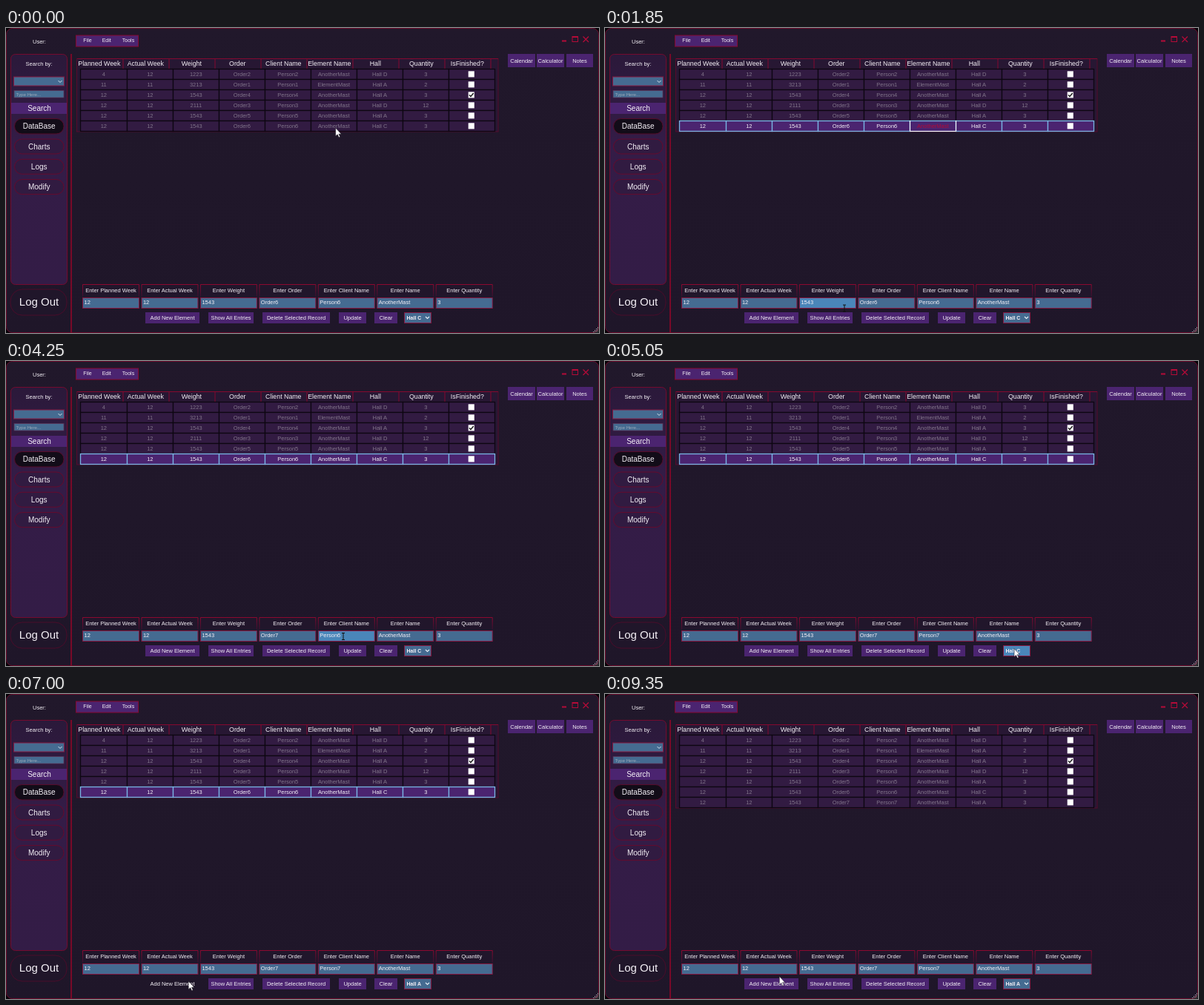
These frames come from a looping animation (800x412 px, 9.5 s). An HTML page:

```html
<!DOCTYPE html>
<html lang="en">
<head>
<meta charset="utf-8">
<title>Production database</title>
<style>
  html, body { margin: 0; width: 100%; height: 100%; overflow: hidden; background: #000; }
  svg { display: block; width: 800px; height: 412px; }
  text { font-family: "Liberation Sans", Arial, sans-serif; }
</style>
</head>
<body>
<svg id="stage" viewBox="0 0 800 412">
  <defs>
    <linearGradient id="back" x2="0" y2="1">
      <stop offset="0" stop-color="#21182b"/><stop offset="1" stop-color="#1f1629"/>
    </linearGradient>
    <linearGradient id="side" x2="0" y2="1">
      <stop offset="0" stop-color="#2b193a"/><stop offset=".4" stop-color="#341c47"/><stop offset="1" stop-color="#331c46"/>
    </linearGradient>
    <linearGradient id="edge" x2="0" y2="1">
      <stop offset="0" stop-color="#8c0930"/><stop offset="1" stop-color="#3a1030"/>
    </linearGradient>
  </defs>
</svg>
<script>
const LOOP = 9500, STEP = 50;
const stage = document.getElementById("stage");
const PURPLE = "#4b2470", BLUE = "#456b91", BRIGHT = "#4a86b9";
const RED = "#850930", FIELD_EDGE = "#851a43", CELL = "#321b42", CELL_EDGE = "#0d0712";
const GREY = "#81758a", WHITE = "#f4f0f6";

function add(tag, attrs, parent = stage) {
  const el = document.createElementNS("http://www.w3.org/2000/svg", tag);
  set(el, attrs);
  parent.appendChild(el);
  return el;
}
function set(el, attrs) {
  for (const key in attrs) el.setAttribute(key, attrs[key]);
}
// Corner coordinates in, rectangle out.
function box(x1, y1, x2, y2, fill, stroke = "none", extra = {}, parent = stage) {
  return add("rect", { x: x1, y: y1, width: x2 - x1, height: y2 - y1, fill, stroke, ...extra }, parent);
}
function label(str, x, y, size = 7.5, fill = WHITE, anchor = "middle", parent = stage) {
  const el = add("text", { x, y, "font-size": size, fill, "text-anchor": anchor }, parent);
  el.textContent = str;
  return el;
}
function line(d, stroke, width = 1, parent = stage) {
  return add("path", { d, stroke, "stroke-width": width, fill: "none" }, parent);
}
function show(el, on) { el.style.display = on ? "" : "none"; }

// Window
box(0, 0, 800, 412, "#050207");
box(0.5, 0.5, 799.5, 411.5, "url(#back)", "#6b0a2a", { rx: 8 });
label("User:", 45, 20.5);
box(94.5, 10, 178.5, 25, PURPLE, RED);
[["File", 110], ["Edit", 135.7], ["Tools", 165]].forEach(([s, x]) => label(s, x, 19.2, 7));
line("M750 17.5H756", "#b50b38", 2);
box(764, 11.5, 771.5, 18.5, "none", "#b50b38");
line("M764 12H771.5", "#b50b38", 2);
line("M778.5 11.5L786 19M786 11.5L778.5 19", "#b50b38", 1.2);
[["Calendar", 677, 714], ["Calculator", 716, 753], ["Notes", 756, 792]].forEach(([s, a, b]) => {
  box(a, 35, b, 53, PURPLE);
  label(s, (a + b) / 2, 46.5);
});
for (let i = 0; i < 4; i++)
  for (let j = 0; j <= i; j++) box(798 - 2 * j, 404 + 2 * i, 799 - 2 * j, 405 + 2 * i, "#c9c4cc");

// Sidebar
box(6.5, 35.5, 82.5, 346.5, "url(#side)", "#740a2e", { rx: 6 });
line("M88 35V412", "#780928", 2);
label("Search by:", 44.5, 51);
box(10.5, 66, 78.5, 78, BLUE, FIELD_EDGE);
line("M70.5 71L73 73.5L75.5 71", "#d8e5ef");
box(11, 84.5, 78, 94, BLUE, "#5d3155", { "stroke-width": .7 });
label("Type Here...", 13.5, 91.5, 6.2, "#9ba9b8", "start");
box(7, 101, 82, 116, PURPLE);
label("Search", 45, 112, 10);
box(11.5, 122.5, 78, 143, "#120c18", "#570c2a", { rx: 10 });
label("DataBase", 44.7, 136.2, 10);
["Charts", "Logs", "Modify"].forEach((s, i) => {
  const y = 150 + 27.3 * i;
  box(11.5, y, 78, y + 20, "#311b41", "#650a2d", { rx: 10 });
  label(s, 44.7, y + 13.6, 10);
});
box(6, 353, 82, 388, "#20162a", "#4a0c2a", { rx: 16 });
label("Log Out", 44.5, 375.2, 15);

// Table
const heads = ["Planned Week", "Actual Week", "Weight", "Order", "Client Name", "Element Name", "Hall", "Quantity", "IsFinished?"];
const edges = [100, 163, 225, 287, 349, 411, 473, 535, 597, 659];
const rows = [
  "4,12,1223,Order2,Person2,AnotherMast,Hall D,3",
  "11,11,3213,Order1,Person1,ElementMast,Hall A,2",
  "12,12,1543,Order4,Person4,AnotherMast,Hall A,3",
  "12,12,2111,Order3,Person3,AnotherMast,Hall D,12",
  "12,12,1543,Order5,Person5,AnotherMast,Hall A,3",
  "12,12,1543,Order6,Person6,AnotherMast,Hall C,3",
  "12,12,1543,Order7,Person7,AnotherMast,Hall A,3"
];
const frame = box(95.5, 41.5, 664, 140, "#271733", "#570b2c");
heads.forEach((s, i) => {
  label(s, (edges[i] + edges[i + 1]) / 2 - 5.7, 51.2, 8.8);
  const x = edges[i + 1] - 5;
  box(x - .5, 42, x + .5, 55, RED);
});
line("M96 41.5H664", RED);

const tableRows = rows.map((row, r) => {
  const g = add("g", {}), y = 55 + 14 * r;
  const cells = edges.slice(0, 9).map((x, i) =>
    box(x + .5, y + .5, edges[i + 1] + .5, y + 14.5, CELL, CELL_EDGE, { "stroke-width": 1.3 }, g));
  const texts = row.split(",").map((s, i) => label(s, (edges[i] + edges[i + 1]) / 2 + .3, y + 9.8, 7.5, GREY, "middle", g));
  box(623.7, y + 3.3, 631.8, y + 11.4, "#fff", "none", {}, g);
  if (r === 2) line(`M625 ${y + 7.4}L627 ${y + 9.4}L630.7 ${y + 5}`, "#111", 1.4, g);
  return { g, cells, texts };
});
const target = tableRows[5];
const focusCell = line("M411.5 125V140M473.5 125V140M411 139.5H474", "#fff", 1);

// Entry form
const fieldNames = ["Planned Week", "Actual Week", "Weight", "Order", "Client Name", "Name", "Quantity"];
const values = ["12", "12", "1543", "Order6", "Person6", "AnotherMast", "3"];
const fields = fieldNames.map((s, i) => {
  const x = 103.5 + 79.45 * i, end = x + 76;
  box(x, 346.5, end, 363, "#21162b");
  line(`M${x} 363V346.5H${end}V363`, "url(#edge)");
  label("Enter " + s, x + 38, 357.2);
  const rect = box(x, 364.5, end, 378.5, BLUE, FIELD_EDGE);
  return { x, end, rect, text: label(values[i], x + 2, 372.6, 7.5, WHITE, "start") };
});
const caret = line("M367.3 366V375", "#fff", 1);

const buttons = [["Add New Element", 188, 261], ["Show All Entries", 273, 334], ["Delete Selected Record", 346, 437],
  ["Update", 449, 486], ["Clear", 497, 528]].map(([s, x, end]) => {
  const rect = box(x, 384, end, 399, PURPLE);
  label(s, (x + end) / 2, 394.2);
  return { x, end, rect };
});
const combo = box(537.5, 384.5, 573.5, 398.5, BLUE, FIELD_EDGE);
const comboText = label("Hall C", 540.5, 393.5, 7, WHITE, "start");
comboText.setAttribute("font-weight", "bold");
const comboArrow = line("M566 390L568.5 392.5L571 390", "#e3edf5", 1.2);
const popup = add("g", {});
box(537.5, 399, 573.5, 413, BLUE, FIELD_EDGE, {}, popup);
label("Hall A", 540.5, 408.3, 7, WHITE, "start", popup).setAttribute("font-weight", "bold");

// Pointer shapes, drawn from the tip or the centre
const arrow = add("path", { d: "M0 0V11L2.5 8.8L4.4 12.8L6 12L4.2 8.2H7.6Z", fill: "#fff", stroke: "#15101b", "stroke-width": .5 });
const beam = line("M-2 -4.5H2M0 -4.5V4.5M-2 4.5H2", "#111", 1);

// Time, x, y
const path = [
  [0, 444.7, 135], [400, 440, 131], [650, 440, 131], [1500, 323, 378.6], [1850, 323, 378.6],
  [2100, 385, 373], [2800, 385, 373], [3050, 396, 372], [3250, 396, 372],
  [3600, 421, 374.5], [4000, 455, 372], [4300, 455, 372], [4750, 552, 388.5], [5250, 552, 388.5],
  [5600, 552, 402], [5900, 552, 402], [6200, 290.3, 279.5], [6450, 292, 330], [6700, 304, 388],
  [6800, 304, 388], [7100, 226, 388], [7400, 266, 392], [7600, 266, 392], [7950, 235.3, 381.5], [LOOP, 235.3, 381.5]
];
function pointerAt(t) {
  const i = path.findIndex((p, k) => k && t <= p[0]);
  const [t0, x0, y0] = path[i - 1], [t1, x1, y1] = path[i];
  let u = (t - t0) / (t1 - t0);
  u = u * u * (3 - 2 * u);
  return [x0 + (x1 - x0) * u, y0 + (y1 - y0) * u];
}

function draw(time) {
  const t = Math.floor((time % LOOP) / STEP) * STEP;
  const within = (a, b) => t >= a && t < b;
  const [x, y] = pointerAt(t);

  const selected = within(450, 8800), red = within(450, 2300);
  target.cells.forEach(c => set(c, { fill: selected ? PURPLE : CELL, stroke: selected ? "#79b4e4" : CELL_EDGE }));
  target.texts.forEach((c, i) => set(c, { fill: !selected ? GREY : red && i === 5 ? "#b30a35" : WHITE }));
  show(focusCell, red);
  show(tableRows[6].g, t >= 8800);
  set(frame, { height: t >= 8800 ? 112.5 : 98.5 });

  const focus = within(2300, 4000) ? 3 : within(4000, 5050) ? 4 : -1;
  let typing = false;
  fields.forEach((f, i) => {
    const over = x > f.x + .5 && x < f.end && y > 364 && y < 379;
    typing = typing || over;
    set(f.rect, { fill: over || i === focus ? BRIGHT : BLUE });
  });
  fields[3].text.textContent = t < 2850 ? "Order6" : t < 3000 ? "Order" : "Order7";
  fields[4].text.textContent = t < 4350 ? "Person6" : t < 4500 ? "Person" : "Person7";
  show(caret, within(2300, 2800));

  buttons.forEach(b => {
    const over = x > b.x && x < b.end && y > 380.5 && y < 400 && t < 8800;
    show(b.rect, !over);
  });

  const open = within(5300, 5950);
  const lit = open || (x > 537 && x < 574 && y > 383 && y < 399);
  set(combo, { fill: lit ? BRIGHT : BLUE });
  show(comboArrow, !lit);
  comboText.textContent = t < 5950 ? "Hall C" : "Hall A";
  show(popup, open);

  const place = { transform: `translate(${x} ${y})` };
  set(arrow, place);
  set(beam, place);
  show(arrow, !typing);
  show(beam, typing);
}

const start = performance.now();
function tick() {
  draw(performance.now() - start);
  requestAnimationFrame(tick);
}
tick();
</script>
</body>
</html>
```
